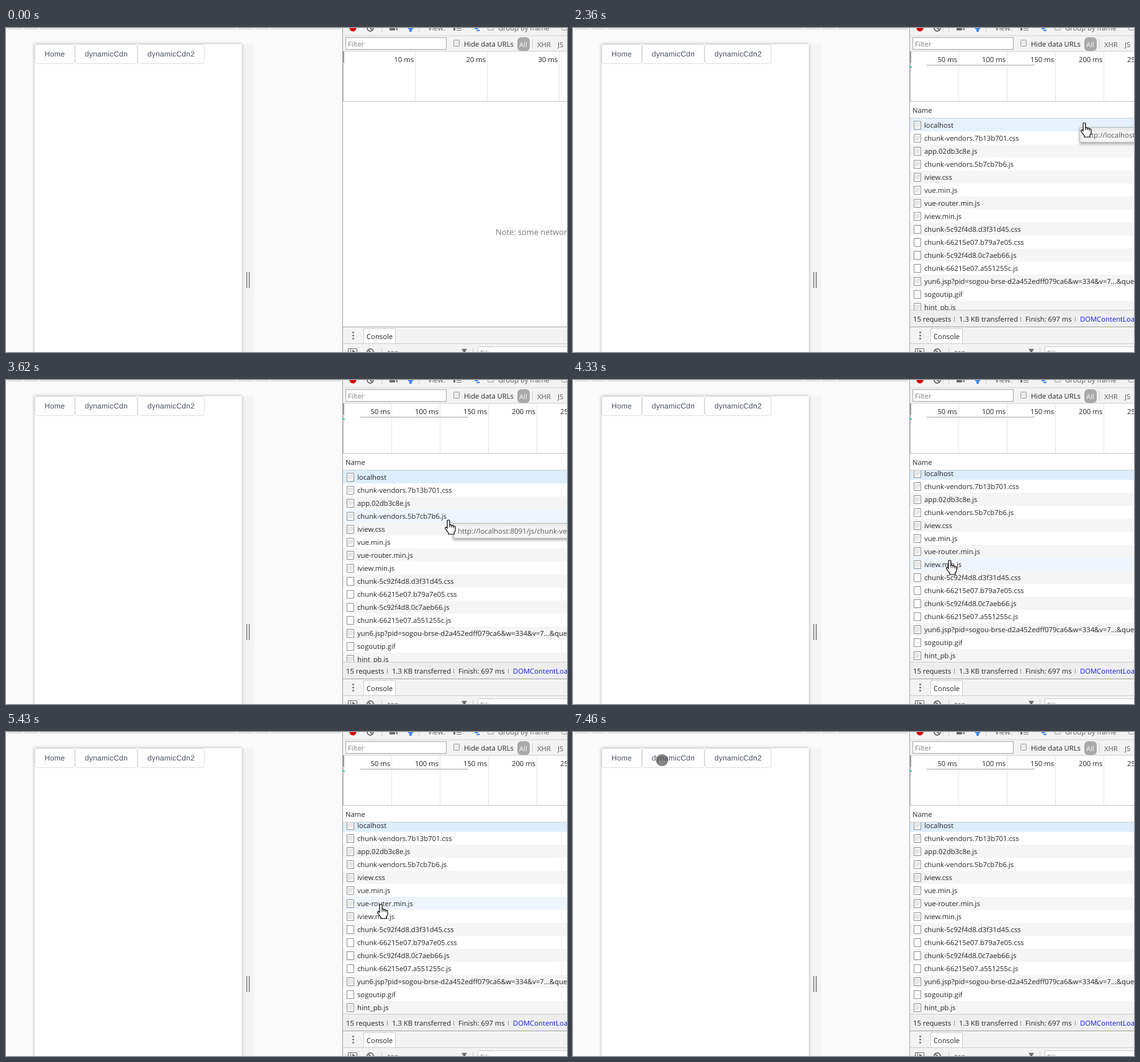
Animation of 904x523 px, one loop 8000 ms. Source, as an HTML page with a canvas:

```html
<!DOCTYPE html>
<html lang="en">
<head>
<meta charset="utf-8">
<title>Network panel</title>
<style>
html, body { margin: 0; width: 100%; height: 100%; overflow: hidden; background: #fafafa; }
canvas { display: block; }
</style>
</head>
<body>
<canvas id="stage" width="904" height="523"></canvas>
<script>
const ctx = document.getElementById('stage').getContext('2d');
const LOOP = 8000, ROW = 21, LIST_TOP = 146, LIST_END = 455;
const ui = size => `${size}px "Open Sans", "Noto Sans", sans-serif`;
const UI = ui(11.25), TIP = ui(11.45), NOTE = ui(12.85);
const PAGE = '12px "Liberation Sans", Arial, sans-serif';

const files = ['localhost', 'chunk-vendors.7b13b701.css', 'app.02db3c8e.js',
  'chunk-vendors.5b7cb7b6.js', 'iview.css', 'vue.min.js', 'vue-router.min.js',
  'iview.min.js', 'chunk-5c92f4d8.d3f31d45.css', 'chunk-66215e07.b79a7e05.css',
  'chunk-5c92f4d8.0c7aeb66.js', 'chunk-66215e07.a551255c.js',
  'yun6.jsp?pid=sogou-brse-d2a452edff079ca6&w=334&v=7...&query=1',
  'sogoutip.gif', 'hint_pb.js'];

// Pointer tracks: [time, x, y]
const tracks = [
  [[500, 623, 275], [740, 584, 28], [830, 578, -20]],
  [[2060, 868, 20], [2290, 824, 154], [2660, 824, 154], [2900, 800, 40],
   [3220, 790, 122], [3370, 790, 122], [3600, 713, 227], [3700, 713, 227],
   [3900, 650, 330], [4160, 620, 254], [4260, 620, 254], [4640, 550, 458],
   [4980, 613, 376], [5120, 613, 376], [5580, 599, 232], [5800, 599, 232],
   [6200, 602, 266], [6350, 602, 266], [6450, 600, 276], [6590, 600, 276],
   [7380, 141, 48], [7460, 143, 46], [LOOP, 143, 46]]
];

// Tooltips: [from, to, x, y, text]
const tips = [
  [2340, 2660, 816, 160, 'http://localhost:8091/'],
  [3600, 3700, 720, 231, 'http://localhost:8091/js/chunk-vendors.5b7cb7b6.js'],
  [5000, 5120, 622, 400, 'http://localhost:8091/js/chunk-66215e07.a551255c.js'],
  [5560, 5800, 606, 238, 'https://unpkg.com/iview@3.4.2/dist/styles/iview.css'],
  [6240, 6360, 609, 257, 'https://unpkg.com/vue@2.6.10/dist/vue.min.js'],
  [6440, 6590, 608, 279, 'https://unpkg.com/vue-router@3.0.6/dist/vue-router.min.js']
];

function rect(x, y, w, h, color) {
  ctx.fillStyle = color;
  ctx.fillRect(x, y, w, h);
}

function box(x, y, w, h, fill, stroke, r = 0) {
  ctx.beginPath();
  ctx.roundRect(x + .5, y + .5, w - 1, h - 1, r);
  ctx.fillStyle = fill;
  ctx.fill();
  ctx.lineWidth = 1;
  ctx.strokeStyle = stroke;
  ctx.stroke();
}

function text(s, x, y, color = '#262626', font = UI, align = 'left') {
  ctx.font = font;
  ctx.textAlign = align;
  ctx.fillStyle = color;
  ctx.fillText(s, x, y);
}

function disc(x, y, r, color) {
  ctx.beginPath();
  ctx.arc(x, y, r, 0, 7);
  ctx.fillStyle = color;
  ctx.fill();
}

function shape(d, fill, stroke, width = 1) {
  const p = new Path2D(d);
  if (fill) { ctx.fillStyle = fill; ctx.fill(p); }
  if (stroke) { ctx.lineWidth = width; ctx.strokeStyle = stroke; ctx.stroke(p); }
}

function clearIcon(x, y) {
  shape(`M${x - 5} ${y}a5 5 0 1 0 10 0a5 5 0 1 0 -10 0M${x - 3.5} ${y - 3.5}l7 7`, null, '#6e6e6e', 2);
}

function shadow(color, blur, dy = 0) {
  ctx.shadowColor = color;
  ctx.shadowBlur = blur;
  ctx.shadowOffsetY = dy;
}

function drawPage(t) {
  rect(0, 0, 542, 523, '#fafafa');
  rect(0, 0, 540, 3, '#e6e6e6');
  for (const x of [1, 27, 53, 371, 399, 424]) rect(x, 0, 2, 4, '#fafafa');
  rect(381, 26, 19, 497, '#f4f4f4');
  shadow('rgba(0,0,0,.3)', 5);
  rect(46, 26, 334, 510, '#fff');
  shadow('transparent', 0);
  rect(387, 394, 2, 26, '#999');
  rect(391, 394, 2, 26, '#999');
  if (t >= 1520 && t < 2060) return;
  ctx.letterSpacing = '.25px';
  [['Home', 46, 65], ['dynamicCdn', 111, 101], ['dynamicCdn2', 212, 108]].forEach(([s, x, w]) => {
    box(x, 26, w, 32, '#fff', '#dcdcdf', 3.5);
    text(s, x + 16, 46, '#495060', PAGE);
  });
  ctx.letterSpacing = '0px';
}

function drawToolbar() {
  rect(543, 0, 361, 38, '#f3f3f3');
  disc(559, 0, 5.5, '#d80000');
  clearIcon(587, 0);
  rect(605, 0, 1, 7, '#ccc');
  rect(665, 0, 1, 7, '#ccc');
  shape('M618 0h9v4h-9zM628 1l3-1v4l-3-2z', '#6e6e6e');
  shape('M647 0h10l-3 3v3h-4v-3z', '#4285f4');
  text('View:', 680, 4, '#5a5a5a');
  rect(721, 0, 3, 4, '#6e6e6e');
  rect(726, 0, 8, 1, '#6e6e6e');
  rect(726, 3, 8, 1, '#6e6e6e');
  rect(755, 0, 6, 2, '#4285f4');
  rect(758, 3, 5, 2, '#4285f4');
  box(776, -6, 10, 10, '#eee', '#999', 1);
  text('Group by frame', 793, 4, '#5a5a5a');
  box(895, -6, 10, 10, '#eee', '#999', 1);
  rect(543, 12, 361, 1, '#d5d5d5');
  box(547, 15, 163, 20, '#fff', '#a3a3a3');
  text('Filter', 551, 30, '#808080');
  box(721, 19, 10, 11, '#ececec', '#999', 1);
  text('Hide data URLs', 738, 30);
  ctx.beginPath();
  ctx.roundRect(824, 15, 20, 22, 6);
  ctx.fillStyle = '#a8a8a8';
  ctx.fill();
  text('All', 827, 31, '#fff');
  rect(848, 18, 1, 16, '#ccc');
  text('XHR', 856, 31, '#5a5a5a');
  text('JS', 889, 31, '#5a5a5a');
}

function drawOverview(loaded) {
  rect(543, 38, 361, 80, '#fff');
  rect(543, 37, 361, 1, '#d0d0d0');
  const step = loaded ? 78 : 116, unit = loaded ? 50 : 10;
  for (let i = 1; i < 6; i++) {
    const x = 543 + step * i;
    rect(x, 38, 1, 80, '#e5e5e5');
    text(unit * i + ' ms', x - 2, 55, '#262626', UI, 'right');
  }
  rect(543, 38, 1, 80, '#bbb');
  rect(543, 38, 2, 18, '#999');
  if (loaded) {
    rect(570, 59, 174, 2, '#ccc');
    rect(543, 62, 3, 2, '#1cc');
  }
  rect(543, 118, 361, 1, '#c4c4c4');
}

function fileIcon(i, y) {
  box(549, y + 4, 12, 14, '#fff', '#8f8f8f');
  if (i > 7 && i < 12) return;
  if (i == 13) return rect(551, y + 11, 8, 1, '#dfe7ef');
  for (let k = 0; k < 4; k++) rect(551, y + 7 + k * 2, k == 3 ? 6 : 8, 1, '#d0d0d0');
}

function drawList(t, count, scroll, mouse) {
  rect(543, 119, 361, 26, '#fff');
  text('Name', 547, 137);
  rect(543, 145, 361, 1, '#ccc');
  ctx.save();
  ctx.beginPath();
  ctx.rect(543, LIST_TOP, 361, LIST_END - LIST_TOP);
  ctx.clip();
  const hover = mouse && inList(mouse) ? Math.floor((mouse.y - LIST_TOP + scroll) / ROW) : -1;
  for (let i = 0; i < count; i++) {
    const y = LIST_TOP + i * ROW - scroll;
    let color = i % 2 ? '#fff' : '#f5f5f5';
    if (i == hover) color = i ? '#eff5fe' : '#e6f1fd';
    if (i == 0 && t > 2740) color = '#dceefe';
    rect(543, y, 361, ROW, color);
    fileIcon(i, y);
    text(files[i], 566, y + 15);
  }
  ctx.restore();
}

function drawStatus(loaded) {
  rect(543, LIST_END, 361, 27, '#eee');
  rect(543, LIST_END, 361, 1, '#ccc');
  const parts = loaded
    ? [['15 requests', 548], ['1.3 KB transferred', 622], ['Finish: 697 ms', 729], ['DOMContentLoaded: 612 ms', 817]]
    : [['1 requests', 548], ['0 B transferred', 616]];
  parts.forEach(([s, x], i) => {
    text(s, x, 474, i == 3 ? '#1a1aee' : '#262626');
    if (i) rect(x - 8, 466, 1, 8, '#999');
  });
}

function drawDrawer() {
  rect(543, 482, 361, 41, '#f3f3f3');
  rect(543, 482, 361, 1, '#a3a3a3');
  for (const y of [492, 497, 502]) disc(559.5, y - .5, 1.4, '#6e6e6e');
  rect(543, 509, 361, 1, '#ccc');
  box(576, 485, 52, 25, '#fff', '#ccc');
  text('Console', 581, 502);
  shape('M551.5 523v-5.5h14v5.5M555.5 517v6', null, '#6e6e6e');
  shape('M558 519l5 4h-5z', '#6e6e6e');
  clearIcon(587, 523);
  rect(605, 516, 1, 7, '#ccc');
  text('top', 615, 528, '#5a5a5a');
  shape('M734 518h9l-4.5 7z', '#6e6e6e');
  rect(752, 516, 1, 7, '#ccc');
  box(760, 514, 160, 20, '#fff', '#ccc');
  text('Filter', 764, 529, '#808080');
}

function drawTip([, , x, y, s]) {
  ctx.font = TIP;
  const w = ctx.measureText(s).width + 17;
  shadow('rgba(0,0,0,.3)', 4, 2);
  box(x, y, Math.round(w), 25, '#f6f6f6', '#bbb');
  shadow('transparent', 0);
  text(s, x + 8, y + 17, '#575757', TIP);
}

function pointer(t) {
  const track = tracks.find(k => t >= k[0][0] && t < k.at(-1)[0]);
  if (!track) return null;
  const i = track.findIndex(k => k[0] > t);
  const [t0, x0, y0] = track[i - 1], [t1, x1, y1] = track[i];
  const p = (t - t0) / (t1 - t0);
  return { x: Math.round(x0 + (x1 - x0) * p), y: Math.round(y0 + (y1 - y0) * p) };
}

const inList = m => m.x > 543 && m.y >= LIST_TOP && m.y < LIST_END;

function drawPointer(m) {
  ctx.save();
  ctx.translate(m.x, m.y);
  if (m.x > 46 && m.x < 380 && m.y > 26) {
    disc(.5, -.5, 9.5, 'rgba(70,70,70,.65)');
    shape('M-8.5-.5a9 9 0 1 0 18 0a9 9 0 1 0-18 0', null, 'rgba(70,70,70,.4)');
  } else if (inList(m)) {
    shape('M-2 1Q-2-1 0-1T2 1V7Q5 6 5 8Q8 7 8 9Q11 8 11 11V15Q11 18 9 19V22H0V20L-5 13Q-6 11-4 10.5L-2 12Z', '#fff', '#000', 1.2);
    shape('M2 7v4M5 8v3M8 9v3', null, '#000');
  } else {
    shape('M.5.5V16L4 12.5 6.5 18.5 9 17.5 6.5 11.5H11.5Z', '#fff', '#000');
  }
  ctx.restore();
}

function draw(t) {
  const loaded = t >= 2140;
  const mouse = pointer(t);
  ctx.textRendering = 'geometricPrecision';
  drawPage(t);
  drawToolbar();
  drawOverview(loaded);
  rect(543, 119, 361, 364, '#fff');
  if (t < 1440) {
    text('Note: some network activity', 789, 334, '#777', NOTE);
  } else {
    const count = t < 1980 ? 1 : t < 2060 ? 8 : t < 2140 ? 12 : files.length;
    const scroll = Math.min(6, Math.max(0, Math.round((t - 3900) / 10)));
    drawList(t, count, scroll, mouse);
    drawStatus(loaded);
  }
  drawDrawer();
  rect(542, 0, 1, 523, '#a3a3a3');
  const tip = tips.find(k => t >= k[0] && t < k[1]);
  if (tip) drawTip(tip);
  if (mouse) drawPointer(mouse);
}

let start;
function tick(now) {
  start ??= now;
  draw((now - start) % LOOP);
  requestAnimationFrame(tick);
}
requestAnimationFrame(tick);
</script>
</body>
</html>
```
